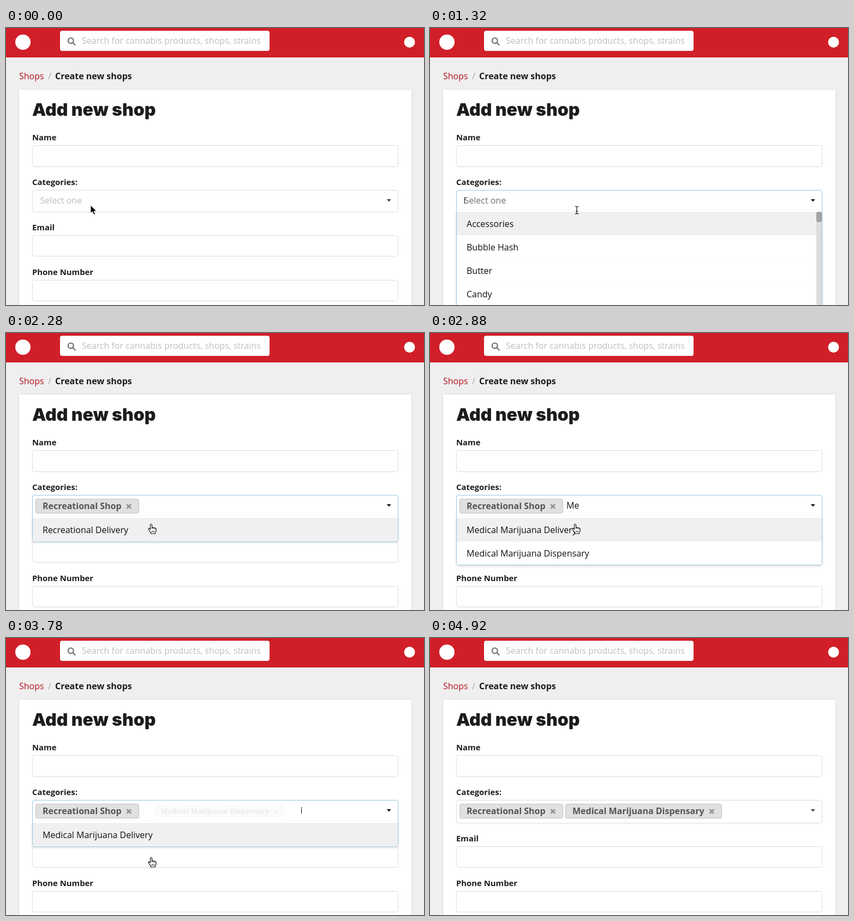
Write an HTML page that moves like this. It is 766 px wide and 508 px high and loops after 5100 ms.

```html
<!DOCTYPE html>
<html lang="en">
<head>
<meta charset="utf-8">
<title>Add new shop</title>
<style>
html, body { margin: 0; width: 100%; height: 100%; overflow: hidden; background: #efefef; }
svg { display: block; font: 16px "Open Sans", sans-serif; }
.bold { font-weight: 700; }
.label { font-weight: 700; font-size: 14.86px; fill: #1b1c1d; }
.title { font: 900 32px Inter, sans-serif; fill: #1b1c1d; }
.input { fill: #fff; stroke: #dcdcdc; }
.input.focus { stroke: #96c8da; }
.card { fill: #fff; filter: drop-shadow(0 1px 2px rgba(0, 0, 0, .1)); }
.frame { fill: #fff; stroke: #96c8da; filter: drop-shadow(0 2px 2px rgba(34, 36, 38, .15)); }
.tag { transform-box: fill-box; transform-origin: center; }
.tag rect { fill: #e0e0e0; stroke: #c2c2c2; }
.tag text { font-weight: 700; fill: #555; }
.tag path { stroke: #969696; stroke-width: 3; }
</style>
</head>
<body>
<svg width="766" height="508" viewBox="0 0 766 508">
  <rect width="766" height="508" fill="#efefef"/>
  <rect width="766" height="54" fill="#d01f28"/>
  <circle cx="31" cy="26" r="14" fill="#fff"/>
  <circle cx="739.5" cy="26" r="10" fill="#fff"/>
  <rect x="99" y="5" width="384" height="37" rx="4" fill="#fff"/>
  <g fill="none" stroke="#777" stroke-width="2.4">
    <circle cx="118.8" cy="23.3" r="4.9"/>
    <path d="M122.3 26.8l4.2 4.2" stroke-linecap="round"/>
  </g>
  <text x="139" y="29" fill="#bfbfbf">Search for cannabis products, shops, strains</text>

  <text x="24" y="94" fill="#b5171f">Shops</text>
  <text x="77" y="94" fill="#aaa">/</text>
  <text x="90" y="94" class="bold" fill="#1b1c1d">Create new shops</text>

  <rect class="card" x="24" y="113" width="719" height="420" rx="4"/>
  <text class="title" x="48" y="161">Add new shop</text>
  <text class="label" x="48" y="206">Name</text>
  <rect class="input" x="48.5" y="215.5" width="670" height="39" rx="4"/>
  <text class="label" x="48" y="288">Categories:</text>

  <g id="below">
    <text class="label" x="48" y="371">Email</text>
    <rect class="input" x="48.5" y="380.5" width="670" height="38" rx="4"/>
    <text class="label" x="48" y="453">Phone Number</text>
    <rect class="input" x="48.5" y="462.5" width="670" height="38" rx="4"/>
  </g>

  <rect id="field" class="input" x="48.5" y="297.5" width="670" height="40" rx="4"/>
  <text id="query" y="322"></text>
  <path id="caret" d="M0 310v12" stroke="#111"/>
  <path id="arrow" d="M697.7 314h8l-4 4.4z" fill="#333"/>
  <g id="tags"></g>
  <g id="menu"></g>
  <g id="cursor">
    <path id="point" d="M0 0v15l3.5-3.2 2.5 5.6 2.6-1.1-2.4-5.4h4.8z" fill="#000" stroke="#fff"/>
    <g id="beam" fill="none">
      <path d="M-3.5-7q3 0 3.5 1.5q.5-1.5 3.5-1.5M0-5.5v11M-3.5 7q3 0 3.5-1.5q.5 1.5 3.5 1.5M-2 2h4" stroke="#fff" stroke-width="3"/>
      <path d="M-3.5-7q3 0 3.5 1.5q.5-1.5 3.5-1.5M0-5.5v11M-3.5 7q3 0 3.5-1.5q.5 1.5 3.5 1.5M-2 2h4" stroke="#111" stroke-width="1.2"/>
    </g>
    <g id="hand">
      <path d="M-1.5 1q0-1.5 1.4-1.5T1.5 1v5q1.2-1 2.6.2q1.5-.8 2.6.6q2-.4 2.3 1.4v3q0 2-1.5 3.8v2H-.6v-2Q-3-12-3-12" fill="none" stroke="none"/>
      <path d="M-1.5 1Q-1.5-.5 0-.5T1.5 1V6Q2.8 5 4.1 6.2Q5.6 5.4 6.7 6.8Q8.7 6.4 9 8.2V11Q9 13 7.5 15V17H-.5V15Q-3 12.5-4.8 9Q-5.4 7.6-4.2 7.2Q-3 7-1.5 9.2Z" fill="#fff" stroke="#111" stroke-width="1.2" stroke-linejoin="round"/>
      <path d="M1.5 6v2.5M4.1 6.4v2.3M6.7 7v2M1.5 11.5v3M3.6 11.5v3M5.7 11.5v3" stroke="#111" stroke-width=".9"/>
    </g>
  </g>
</svg>
<script>
const LOOP = 5100, STEP = 60, FADE = 200;
const OPEN = 487, PICK1 = 2065, PICK2 = 3758, CLOSE = 4290;
const $ = id => document.getElementById(id);
const clamp = v => Math.max(0, Math.min(1, v));

const ALL = ['Accessories', 'Bubble Hash', 'Butter', 'Candy', 'Capsules', 'Concentrate'];
const REC = ['Recreational Delivery', 'Recreational Shop'];
const MED = ['Medical Marijuana Delivery', 'Medical Marijuana Dispensary'];

// [time, value], each held until the next
const typed = [[0, ''], [1380, 'R'], [1440, 'Re'], [1560, 'Rec'], [1620, 'Recr'], [PICK1, ''],
  [2700, 'M'], [2820, 'Me'], [2940, 'Med'], [3000, 'Medi'], [PICK2, '']];
const lists = [[0, ALL], [1440, REC], [PICK1, REC.slice(0, 1)], [2700, MED], [PICK2, MED.slice(0, 1)]];

// [time, x, y, pointer shape from here on]
const path = [
  [0, 155, 325, 'point'], [60, 155, 325, 'beam'], [480, 178, 322, 'beam'],
  [540, 190, 340, 'hand'], [660, 215, 380, 'hand'], [900, 236, 420, 'hand'],
  [1080, 255, 385, 'hand'], [1220, 267, 339, 'beam'], [1320, 269, 334, 'beam'],
  [1680, 269, 334, 'beam'], [1740, 269, 339, 'hand'], [2000, 267, 403, 'hand'],
  [2080, 267, 403, 'hand'], [2280, 266, 351, 'hand'], [3200, 266, 351, 'hand'],
  [3480, 264, 385, 'hand'], [3620, 266, 403, 'hand'], [3820, 266, 403, 'beam'],
  [4200, 716, 392, 'point'], [4260, 727, 390, 'point'], [4320, 727, 390, 'point'],
  [4560, 775, 388, 'point']
];

function last(rows, t) {
  let i = rows.length - 1;
  while (i && rows[i][0] > t) i--;
  return i;
}

// CSS "ease" curve
function ease(x) {
  if (x <= 0 || x >= 1) return clamp(x);
  let lo = 0, hi = 1, s = .5;
  for (let i = 0; i < 20; i++) {
    s = (lo + hi) / 2;
    if (.75 * s * (1 - s) + s ** 3 < x) lo = s; else hi = s;
  }
  return .3 * s * (1 - s) ** 2 + 3 * s * s * (1 - s) + s ** 3;
}
const since = (t, start) => ease((t - start) / FADE);

function tag(x, w, name) {
  return `<g class="tag"><rect x="${x + .5}" y="304.5" width="${w - 1}" height="26" rx="3"/>
    <text x="${x + 13}" y="323">${name}</text>
    <path d="M${x + w - 22.5} 314.2l7.6 7.6m0-7.6l-7.6 7.6"/></g>`;
}
$('tags').innerHTML = tag(54, 190, REC[1]) + tag(248, 287, MED[1]);
const tags = $('tags').children;

function menuMarkup(items) {
  const long = items === ALL, h = items.length * 43, right = long ? 708 : 718;
  const rows = items.map((name, i) => {
    const fill = i ? '#fff' : '#f0f0f0';
    const line = i ? `<path d="M49 ${i * 43 + .5}H${right}" stroke="#fafafa"/>` : '';
    return `<rect x="49" y="${i * 43}" width="${right - 49}" height="${i === items.length - 1 ? 42 : 43}" fill="${fill}"/>
      ${line}<text x="67" y="${i * 43 + 28}" fill="#111">${name}</text>`;
  }).join('');
  const bar = long ? `<rect x="708" width="10" height="${h}" fill="#dcdcdc"/>
    <rect x="708" width="10" height="19" rx="4" fill="#a3a3a3"/>` : '';
  return `<path class="frame" d="M48.5-3V${h - 3.5}q0 4 4 4H714.5q4 0 4-4V-3"/>${rows}${bar}`;
}

let shown;
function drawMenu(t, top) {
  const items = lists[last(lists, t)][1];
  if (items !== shown) $('menu').innerHTML = menuMarkup(shown = items);
  const k = since(t, OPEN) * (1 - since(t, CLOSE));
  $('menu').setAttribute('transform', `translate(0 ${top}) scale(1 ${k})`);
  $('menu').style.opacity = k;
  $('menu').style.display = k > 0 ? '' : 'none';
}

function drawField(t, picked, focus) {
  const text = typed[last(typed, t)][1], empty = !text && !picked;
  $('field').setAttribute('height', picked ? 42 : 40);
  $('field').classList.toggle('focus', focus);
  $('query').textContent = empty ? 'Select one' : text;
  $('query').setAttribute('x', picked ? 250 : 62.5);
  $('query').setAttribute('fill', !empty ? '#111' : focus ? '#737373' : '#bfbfbf');
  const second = t >= PICK2;
  $('caret').setAttribute('transform', `translate(${second ? 541.5 : 63.5} 0)`);
  $('caret').style.display = focus && (t < 1380 || second) ? '' : 'none';
  $('arrow').setAttribute('fill', focus ? '#111' : '#444');
  [PICK1, PICK2].forEach((start, i) => {
    const k = since(t, start);
    tags[i].style.opacity = k;
    tags[i].style.transform = `scale(${.8 + .2 * k})`;
  });
}

function drawCursor(t) {
  const i = last(path, t), a = path[i], b = path[i + 1] || a;
  const p = b === a ? 0 : (t - a[0]) / (b[0] - a[0]);
  const at = n => a[n] + (b[n] - a[n]) * p;
  $('cursor').setAttribute('transform', `translate(${at(1)} ${at(2)})`);
  for (const kind of ['point', 'beam', 'hand']) $(kind).style.display = kind === a[3] ? '' : 'none';
}

function draw(now) {
  const t = Math.floor(now % LOOP / STEP) * STEP;
  const picked = t >= PICK1, drop = picked ? 2 : 0;
  $('below').setAttribute('transform', `translate(0 ${drop})`);
  drawField(t, picked, t >= 480 && t < CLOSE);
  drawMenu(t, 337 + drop);
  drawCursor(t);
}

function tick() {
  draw(performance.now());
  requestAnimationFrame(tick);
}
tick();
</script>
</body>
</html>
```
